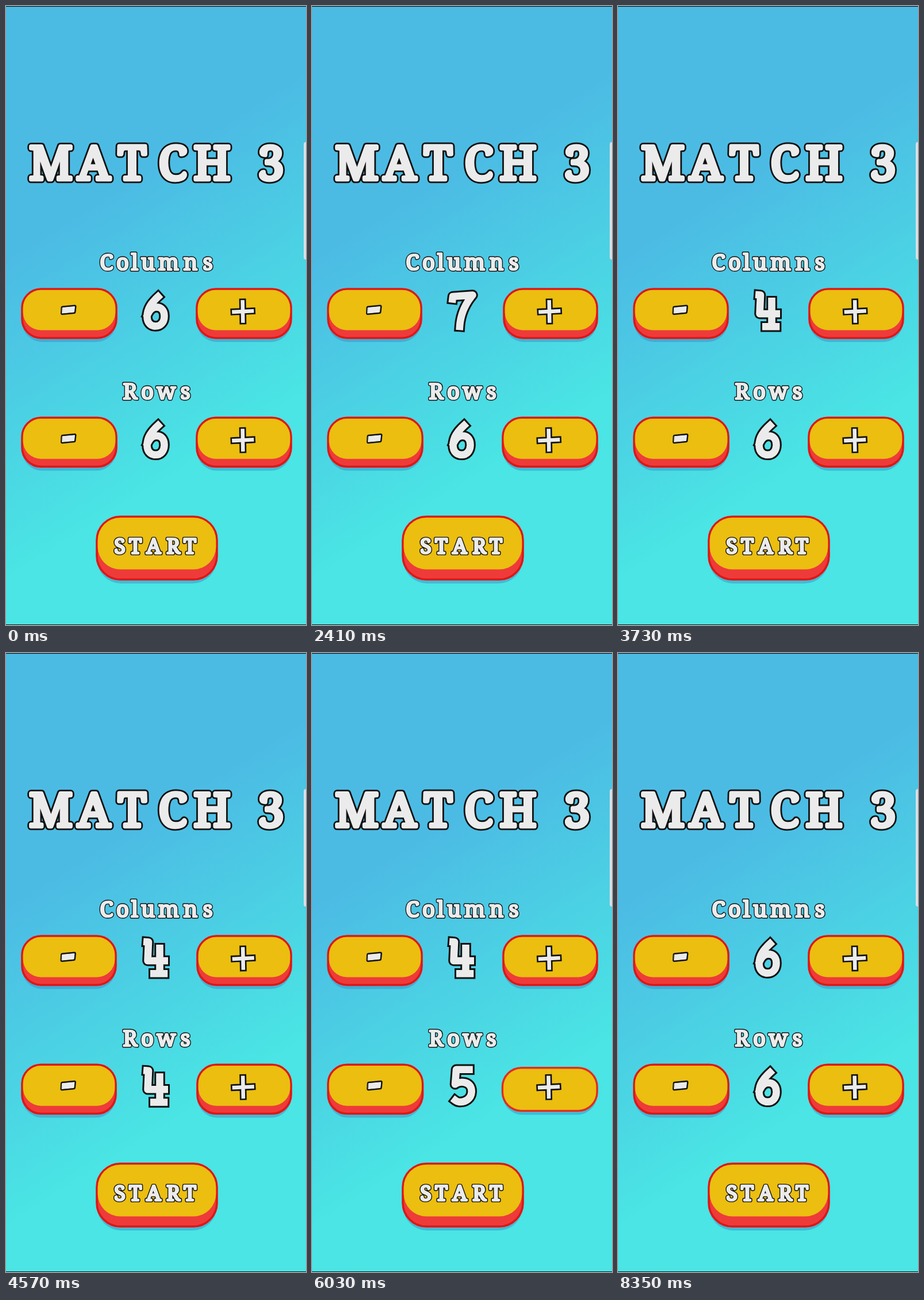
An HTML page that plays this animation: 522 px wide and 1074 px high, repeating every 8.38 s.

```html
<!DOCTYPE html>
<html lang="en">
<head>
<meta charset="utf-8">
<title>Match 3 menu</title>
<style>
  html, body { margin: 0; width: 100%; height: 100%; overflow: hidden; background: #4cbbe4; }
  svg { display: block; width: 100%; height: 100%; }
  text { font-family: "Noto Serif", serif; text-anchor: middle; }
  .ink { stroke-linejoin: round; stroke-linecap: round; }
  .dark { fill: #111; stroke: #111; }
  .light { fill: #ebebeb; stroke: #ebebeb; }
  .line { fill: none; stroke-linecap: square; }
</style>
</head>
<body>
<svg viewBox="0 0 522 1074" preserveAspectRatio="none">
  <defs>
    <linearGradient id="sky" gradientUnits="userSpaceOnUse" x1="0" y1="440" x2="250" y2="840">
      <stop offset="0" stop-color="#4cbbe4"/>
      <stop offset="1" stop-color="#4ae5e4"/>
    </linearGradient>
  </defs>
  <rect width="522" height="1074" fill="url(#sky)"/>
  <rect width="522" height="1.2" fill="#10181c"/>
  <rect y="1073" width="522" height="1" fill="#10181c"/>
  <rect x="518" y="236" width="12" height="204" rx="4" fill="#d8dfe3"/>
  <g id="cols"></g>
  <g id="rows" transform="translate(0 223.3)"></g>
  <g id="start"></g>
  <g id="words"></g>
</svg>
<script>
const LOOP = 8380;
const $ = id => document.getElementById(id);

// Numeral strokes, centred on (0, 0)
const DIGITS = {
  4: 'M-15.7 -26.7L-13 -26.5L-14.5 6H14.7M6.5 -15.7V28M-3.7 28.2H14',
  5: 'M12.5 -28.5H-10L-12 -3C-4 -9 16.7 -9 16.7 9C16.7 22 6 27.7 -3 27.7Q-8 27.7 -11.5 25',
  6: 'M3.5 -23.5C-8 -13 -15.5 -3 -15.5 11C-15.5 22 -9 27.5 -.5 27.5S14.5 21 14.5 10S8 -5.5 1 -5.5Q-9 -5.5 -14.5 7',
  7: 'M-16.5 -19.5L-16 -24L18.5 -26.5Q-2 -2 -4 28'
};
// Wider numerals squeeze the buttons beside them
const SQUEEZE = { 4: 1, 5: -.5, 6: 0, 7: 2 };

// Taps: press time, release time, row, step
const TAPS = [
  [1460, 1580, 'cols', 1],
  [2670, 2790, 'cols', -1],
  [3040, 3160, 'cols', -1],
  [3400, 3520, 'cols', -1],
  [3820, 3940, 'rows', -1],
  [4270, 4390, 'rows', -1],
  [5670, 5790, 'rows', 1],
  [6000, 6120, 'rows', 1],
  [6290, 6410, 'cols', 1],
  [6650, 6770, 'cols', 1]
];

const rect = (x, y, w, h, r, more) =>
  `<rect x="${x}" y="${y}" width="${w}" height="${h}" rx="${r}" ${more}/>`;

const layers = (d, w, rim, kind, at = '') =>
  ['dark', 'light'].map((c, i) =>
    `<path class="ink ${kind} ${c}" d="${d}" stroke-width="${w + (i ? 0 : rim * 2)}" ${at}/>`).join('');

function button(x, y, w, h, r, side, down) {
  if (down) { y += 5.5; h -= 10.5; side = 0; }
  return rect(x + 2, y + 5, w - 4, h, r, 'fill="#3a8fc6" opacity=".5"') +
    rect(x + 2, y + 2, w - 4, h - 4, r - 2,
      `fill="#ee3b39" stroke="${down ? '#e52a1e' : '#e01616'}" stroke-width="3.6"`) +
    rect(x + 3.6, y + 3.8, w - 7.2, h - 7.4 - side, r - 4, 'fill="#ebbe10"');
}

function counter(value, press) {
  const s = SQUEEZE[value], w = 168 - s;
  return button(26, 489, w, 89, 35, 12, press < 0) +
    button(330 + s, 489, w, 89, 35, 12, press > 0) +
    layers('M98.5 523.5L119.5 521.5L118.5 531L98 533Z', 1, 2.5, '', `transform="translate(${-s / 2} 0)"`) +
    layers('M396.5 530.7L428 529.2M411.7 513.5L412.3 546.5', 6.6, 2.6, 'line', `transform="translate(${s / 2} 0)"`) +
    `<g role="img" aria-label="${value}">` +
    layers(DIGITS[value], 12.6, 3, 'line', 'transform="translate(261 528)"') + '</g>';
}

function word(id, str, xs, y, size, w, rim) {
  const use = (c, sw) => `<use href="#${id}" class="ink ${c}" stroke-width="${sw}"/>`;
  return `<defs><text id="${id}" x="${xs}" y="${y}" font-size="${size}">${str}</text></defs>` +
    use('dark', w + rim * 2) + use('light', w);
}

$('start').innerHTML = button(156, 884, 213, 113, 43, 16, false);
$('words').innerHTML =
  word('title', 'MATCH3', '78 153 219.5 290 358.5 461', 300.5, 80, 7, 2.8) +
  word('columns', 'Columns', '175 203 224 247 283 321 351', 458, 38, 3.2, 1.3) +
  word('lines', 'Rows', '216 246 279 312', 682, 38, 3.2, 1.3) +
  word('go', 'START', '198 225 257 291 320', 949.5, 36, 3.4, 1.4);

const shown = {};
function frame() {
  const t = performance.now() % LOOP;
  for (const id of ['cols', 'rows']) {
    let value = 6, press = 0;
    for (const [from, to, row, step] of TAPS) {
      if (row !== id || t < from) continue;
      if (t < to) press = step;
      else value += step;
    }
    const key = value + '/' + press;
    if (shown[id] !== key) {
      shown[id] = key;
      $(id).innerHTML = counter(value, press);
    }
  }
  requestAnimationFrame(frame);
}
frame();
</script>
</body>
</html>
```
